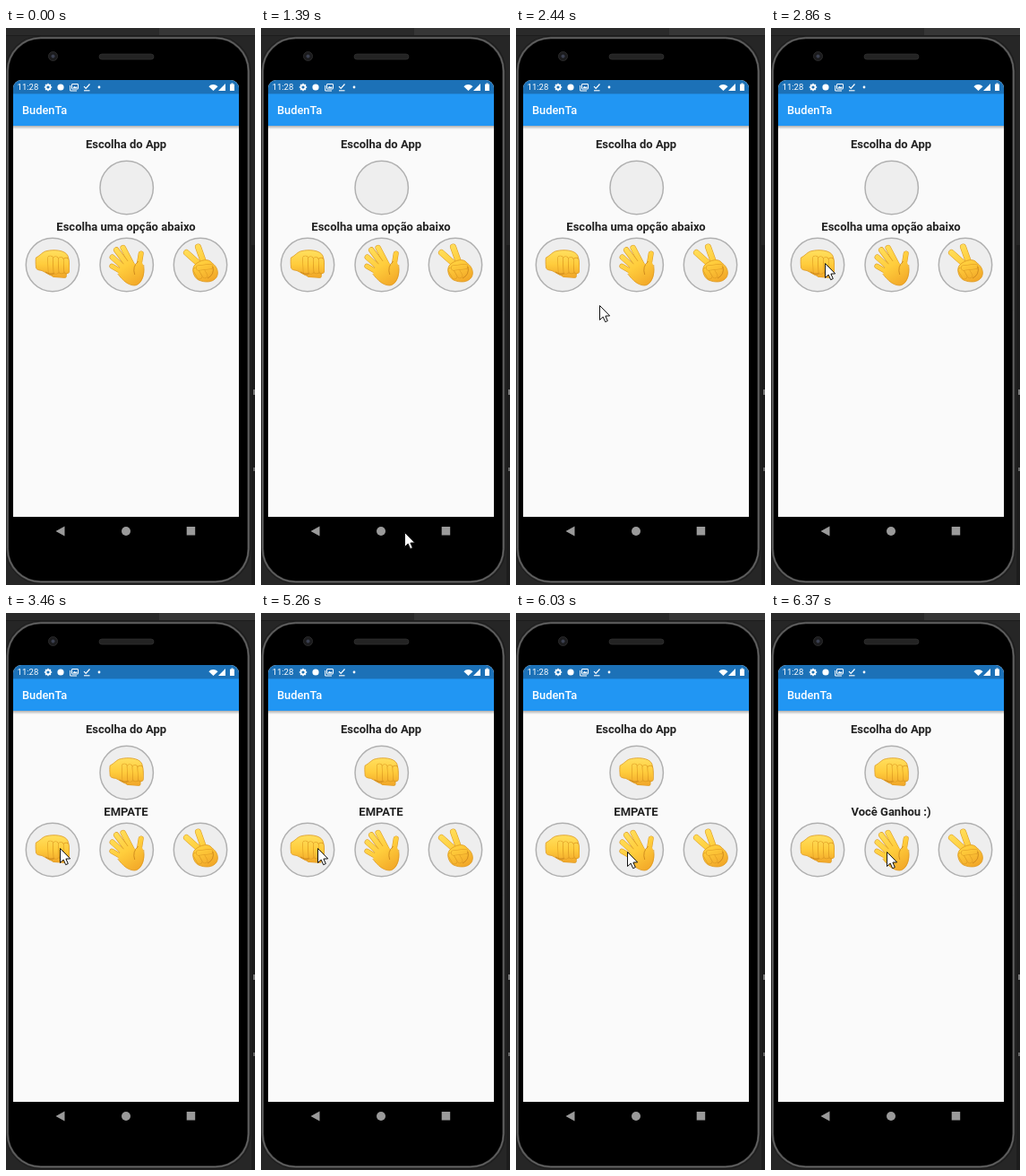
These frames come from a looping animation (278 px wide and 621 px high, 8000 ms). An HTML page with a canvas:

```html
<!DOCTYPE html>
<html lang="pt">
<head>
<meta charset="utf-8">
<title>BudenTa</title>
<style>
html, body { margin: 0; width: 278px; height: 621px; overflow: hidden; background: #2b2b2b; }
canvas { position: absolute; left: 0; top: 0; width: 278px; height: 621px; }
div { position: absolute; white-space: nowrap; font-family: Roboto, sans-serif; line-height: 16px; }
#clock { left: 12.6px; top: 58px; font-size: 9.5px; color: #fff; }
#title { left: 18px; top: 84px; font-size: 12.83px; font-weight: 500; color: #fff; }
.label { left: 8px; width: 252px; text-align: center; font-size: 13px; font-weight: 700; color: #212121; }
#head { top: 122px; }
#msg { top: 213.5px; }
</style>
</head>
<body>
<canvas id="stage"></canvas>
<div id="clock">11:28</div>
<div id="title">BudenTa</div>
<div id="head" class="label">Escolha do App</div>
<div id="msg" class="label">Escolha uma opção abaixo</div>
<script>
const LOOP = 8000;
const canvas = document.getElementById('stage');
const msg = document.getElementById('msg');
const scale = window.devicePixelRatio || 1;
canvas.width = 278 * scale;
canvas.height = 621 * scale;
const c = canvas.getContext('2d');

function rect(x, y, w, h, fill) {
  c.fillStyle = fill;
  c.fillRect(x, y, w, h);
}

function round(x, y, w, h, r, fill, stroke, lw = 1) {
  c.beginPath();
  c.roundRect(x, y, w, h, r);
  paint(fill, stroke, lw);
}

function disc(x, y, r, fill, stroke, lw = 1) {
  c.beginPath();
  c.arc(x, y, r, 0, Math.PI * 2);
  paint(fill, stroke, lw);
}

function poly(pts, fill, stroke, lw = 1) {
  c.beginPath();
  for (let i = 0; i < pts.length; i += 2) c.lineTo(pts[i], pts[i + 1]);
  c.closePath();
  paint(fill, stroke, lw);
}

function paint(fill, stroke, lw) {
  if (fill) { c.fillStyle = fill; c.fill(); }
  if (stroke) { c.strokeStyle = stroke; c.lineWidth = lw; c.stroke(); }
}

function line(pts, color, w) {
  c.beginPath();
  for (let i = 0; i < pts.length; i += 2) c.lineTo(pts[i], pts[i + 1]);
  paint(null, color, w);
}

function fade(x1, y1, x2, y2, ...colors) {
  const g = c.createLinearGradient(x1, y1, x2, y2);
  colors.forEach((col, i) => g.addColorStop(i / (colors.length - 1), col));
  return g;
}

function phone() {
  rect(0, 0, 278, 621, '#262626');
  rect(0, 0, 171, 8, '#2a2a2a');
  rect(171, 0, 107, 8, '#363636');
  rect(0, 8, 278, 1, '#1c1c1c');
  rect(274, 242, 4, 379, '#1d1d1d');
  rect(276, 403, 2, 6, '#777');
  rect(276, 490, 2, 4, '#666');
  round(0.5, 9.5, 272, 609.5, 38, '#000', '#1c1c1c', 1.5);
  round(1.8, 11, 269, 606.5, 37, null, '#454545', 2.6);
  round(1.8, 11, 269, 606.5, 37, null, '#747474', 0.8);
  round(104, 29, 61, 6, 3, '#232323', '#333', 0.7);
  disc(52.5, 31.5, 5, '#1b1b1d', '#2a2a2a');
  disc(52.5, 31.5, 2, '#3b4050');
  poly([55.5, 561, 65.5, 555.5, 65.5, 566.5], '#9a9a9a');
  disc(134, 561, 5, '#9a9a9a');
  rect(201.7, 556, 9.5, 9.5, '#9a9a9a');
}

function statusIcons() {
  disc(47, 66, 2.5, null, '#fff', 1.8);
  for (let i = 0; i < 8; i++) {
    const a = i * Math.PI / 4, x = Math.cos(a), y = Math.sin(a);
    line([47 + x * 3, 66 + y * 3, 47 + x * 4.2, 66 + y * 4.2], '#fff', 1.3);
  }
  disc(61, 66, 3.6, '#fff');
  round(73.5, 62.5, 7, 5.5, 0.5, null, '#fff');
  line([71.7, 64, 71.7, 70, 79, 70], '#fff', 1);
  poly([74.5, 67, 76.3, 64.7, 77.4, 66, 78.4, 65.2, 79.8, 67], '#fff');
  line([87, 65.2, 89.2, 67.4, 93.5, 62.5], '#fff', 1.2);
  line([87, 69.8, 93.5, 69.8], '#fff', 1.1);
  disc(104, 66, 1.4, '#fff');
  c.beginPath();
  c.moveTo(231.5, 70);
  c.arc(231.5, 70, 7, -Math.PI * 0.76, -Math.PI * 0.24);
  paint('#fff');
  poly([237, 70, 245, 62, 245, 70], '#fff');
  round(250, 62.5, 5, 7.5, 0.6, '#fff');
  rect(251.5, 61.5, 2, 1.2, '#fff');
}

function screen() {
  c.save();
  c.beginPath();
  c.roundRect(8, 58, 252, 487, [9, 9, 0, 0]);
  c.clip();
  rect(8, 58, 252, 487, '#fafafa');
  rect(8, 109, 252, 4, fade(0, 109, 0, 113, 'rgba(0,0,0,.3)', 'rgba(0,0,0,0)'));
  rect(8, 73, 252, 36, '#2196f3');
  rect(8, 58, 252, 15.4, '#1c71b7');
  c.restore();
  statusIcons();
}

const EDGE = '#dd9a22', CREASE = '#c67f1a';

// A capsule with a dark edge
function finger(x1, y1, x2, y2, w, skin) {
  c.lineCap = 'round';
  line([x1, y1, x2, y2], EDGE, w);
  line([x1, y1, x2, y2], skin, w - 1.1);
  c.lineCap = 'butt';
}

// Closed outline: a start point, then cubic segments
function blob(x, y, segs, fill, stroke) {
  c.beginPath();
  c.moveTo(x, y);
  for (const s of segs) c.bezierCurveTo(...s);
  paint(fill, stroke, 0.8);
}

function crease(...p) {
  c.beginPath();
  c.moveTo(p[0], p[1]);
  c.quadraticCurveTo(p[2], p[3], p[4], p[5]);
  paint(null, CREASE, 0.8);
}

function fist() {
  const skin = fade(0, -16, 0, 15, '#ffdf5e', '#ffcc3c', '#f0a428');
  blob(-18.5, -8, [
    [-14, -10, -11, -15, -6, -15.5],
    [0, -17, 14, -17, 17, -10],
    [19, -4, 19, 5, 17, 9],
    [15, 12, 8, 13, 2, 13],
    [-4, 12, -8, 8, -12, 6.5],
    [-16, 6, -18.5, 5, -18.5, 3],
    [-19, -2, -19, -6, -18.5, -8]
  ], skin, EDGE);
  finger(2, 11.3, 13, 12, 5.6, skin);
  for (let i = 0; i < 4; i++) {
    const x = -2.5 + i * 5.9;
    finger(x, -7 + i * 0.7, x + 0.6, 7.5 - i * 0.3, 6.5, skin);
  }
  crease(-8, 8, -4, 11, 2, 10);
}

function wave() {
  const skin = fade(-14, -20, 14, 22, '#ffdf5c', '#ffcd3c', '#f2a728');
  finger(13, 6, 16, -12.5, 6, skin);
  finger(7, 2, -4, -19, 6.4, skin);
  finger(3, 3, -11.5, -16.5, 6.4, skin);
  finger(0, 6, -16, -8.5, 6.2, skin);
  finger(0, 11, -16.5, 1.5, 5.6, skin);
  blob(-4, 0, [
    [0, -4, 5, -6, 7, -3],
    [10, 1, 12, 0, 13.5, -5],
    [16, -6, 20, 0, 19.5, 8],
    [19, 17, 14, 23, 9, 23],
    [2, 23, -4, 18, -9, 11],
    [-10, 6, -8, 3, -4, 0]
  ], skin);
  c.beginPath();
  c.moveTo(19, 0);
  c.bezierCurveTo(21, 14, 14, 23, 9, 23);
  c.bezierCurveTo(2, 23, -4, 18, -10, 10);
  paint(null, EDGE, 0.8);
  crease(13, -4, 6, 2, 9, 11);
}

function victory() {
  const skin = fade(-10, -22, 10, 20, '#ffdf5c', '#ffcd3c', '#f1a526');
  finger(5, 1, -2.5, -20, 7, skin);
  finger(3, 3, -15.5, -13.5, 7, skin);
  blob(-5, -1, [
    [0, -5, 9, -8, 13, -2],
    [19, 2, 21, 9, 18, 14],
    [14, 20, 5, 20, -2, 17],
    [-8, 14, -11, 3, -5, -1]
  ], skin, EDGE);
  finger(-5, 6, -1, 13, 6.3, skin);
  finger(1, 5, 5, 12, 6.3, skin);
  finger(11, 2, -2, 3.5, 6, skin);
  crease(14, 2, 16, 11, 8, 15);
}

function button(x, y, hand) {
  disc(x, y, 29.7, '#eee', '#b0b0b0', 1.5);
  if (!hand) return;
  c.save();
  c.translate(x, y);
  hand();
  c.restore();
}

const mix = (a, b, u) => a + (b - a) * u;
const glide = u => 0.5 * u + 0.5 * u * u * (3 - 2 * u);

// Pointer position; it is sampled about every 70 ms
function pointer(t) {
  const step = (from, gap) => Math.floor((t - from + 0.01) / gap);
  if (t < 1320) return null;
  if (t < 2150) {
    const u = 1 - Math.min(step(1320, 70), 11) / 11;
    return [119 + 49 * u ** 1.9, 346 + 251 * u ** 1.56];
  }
  if (t < 5260) {
    const u = glide(Math.min(step(2150, 71) + 1, 11) / 11);
    return [mix(119, 60, u), mix(346, 262, u)];
  }
  if (t < 6110) {
    const u = glide(Math.min(step(5260, 70) + 1, 12) / 12);
    return [mix(60, 124, u), mix(262, 266, u)];
  }
  return [t < 6170 ? 127 : 129, 266];
}

function arrow(x, y) {
  c.save();
  c.translate(Math.round(x) + 0.5, Math.round(y) + 0.5);
  c.lineJoin = 'miter';
  poly([0, 0, 0, 16, 3.7, 12.6, 6.2, 18.2, 8.8, 17, 6.4, 11.6, 11.2, 11.4], '#fff', '#111', 1);
  c.restore();
}

function draw(t) {
  c.setTransform(scale, 0, 0, scale, 0, 0);
  phone();
  screen();
  button(134.7, 178, t >= 3460 && fist);
  button(52, 264, fist);
  button(134.7, 264, wave);
  button(217, 264, victory);

  const tap = (t >= 3130 && t < 3190) || (t >= 6240 && t < 6310);
  const p = pointer(t);
  if (p && tap) disc(p[0], p[1], 11, 'rgba(255,255,255,.45)', 'rgba(130,130,130,.5)', 1);
  if (p) arrow(...p);

  const text = t < 3460 ? 'Escolha uma opção abaixo' : t < 6370 ? 'EMPATE' : 'Você Ganhou :)';
  if (msg.textContent !== text) msg.textContent = text;
}

const start = performance.now();
function tick() {
  draw((performance.now() - start) % LOOP);
  requestAnimationFrame(tick);
}
tick();
</script>
</body>
</html>
```
